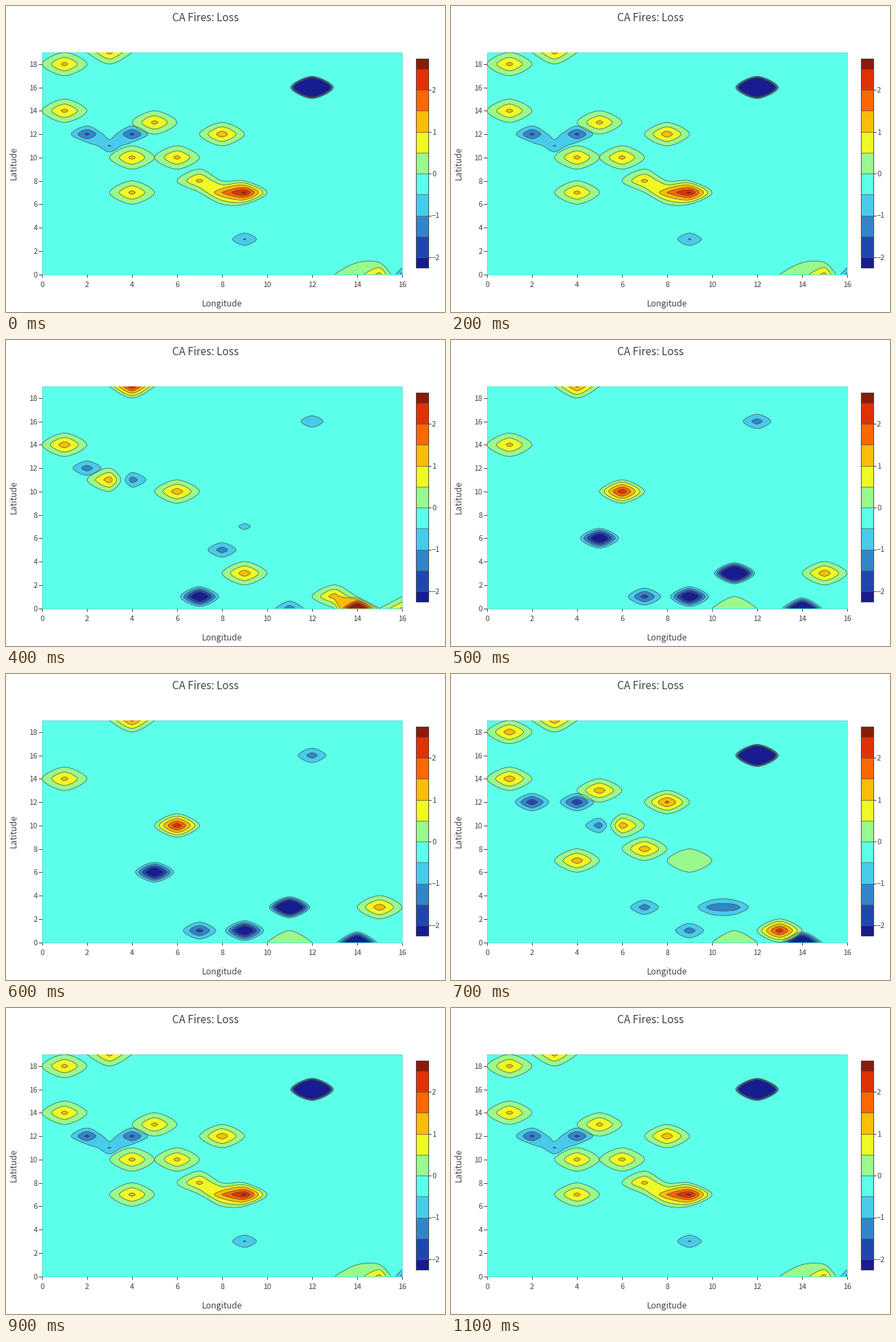
Animation of 634x442 px, one loop 1400 ms. Source, as a matplotlib script:

```python
import numpy as np
import matplotlib.pyplot as plt
from matplotlib.animation import FuncAnimation
from matplotlib.patches import PathPatch, Rectangle
from matplotlib.path import Path

W, H, DPI = 634, 442, 100
PX = 72 / DPI
INK = "#444444"
LEFT, RIGHT, TOP, BOTTOM = 52, 572, 67, 387.5
NX, NY = 17, 20
LEVELS = np.arange(-2, 2.6, 0.5)
COLORS = ["#171c8e", "#1f48ac", "#3385c9", "#48cbeb", "#5cffea", "#98fa8e",
          "#eff926", "#fbbc0a", "#fa6800", "#de3200", "#8a1c08"]
ZERO = 4  # index of the level at 0

plt.rcParams["font.family"] = ["Noto Sans CJK JP", "DejaVu Sans"]

# cell value -> grid cells (longitude, latitude); all others are empty
SPREAD = {
    1.17: [(1, 18), (3, 19), (1, 14), (5, 13), (4, 10), (6, 10), (4, 7),
           (7, 8), (15, 0)],
    1.33: [(8, 12)], 1.52: [(8, 7)], 2.66: [(9, 7)], 0.2: [(14, 0)],
    -1.67: [(2, 12), (4, 12)], -1.06: [(3, 11), (9, 3)],
    -1.17: [(16, 0)], -11: [(12, 16)],
}
SOUTH = {
    1.34: [(1, 14), (3, 11), (6, 10), (9, 3), (13, 1)],
    2.45: [(4, 19)], 4.2: [(14, 0)], 1.1: [(16, 0)],
    -1.32: [(2, 12), (4, 11), (8, 5), (11, 0)],
    -0.98: [(12, 16)], -0.67: [(9, 7)], -3.3: [(7, 1)],
}
SPARSE = {
    1.18: [(1, 14)], 1.35: [(15, 3)], 1.6: [(4, 19)], 2.48: [(6, 10)],
    0.3: [(11, 0)], -1.3: [(12, 16)], -1.8: [(7, 1)],
    -3.3: [(5, 6), (9, 1)], -5: [(11, 3)], -4.5: [(14, 0)],
}
MIXED = {
    1.33: [(1, 18), (3, 19), (1, 14), (5, 13), (6, 10), (4, 7), (7, 8)],
    1.65: [(8, 12)], 2.4: [(13, 1)], 0.3: [(9, 7), (11, 0)],
    -1.98: [(2, 12), (4, 12)],
    -1.32: [(5, 10), (7, 3), (10, 3), (11, 3), (9, 1)],
    -4.5: [(14, 0)], -11: [(12, 16)],
}
STATES = [SPREAD, SOUTH, SPARSE, MIXED]
SCHEDULE = [0, 0, 0, 1, 1, 2, 2, 3, 3, 0, 0, 0, 0, 0]


def px(lon):
    return LEFT + lon * (RIGHT - LEFT) / (NX - 1)


def py(lat):
    return BOTTOM - lat * (BOTTOM - TOP) / (NY - 1)


def handles(prev, here, after):
    """Centripetal Catmull-Rom control points before and after each vertex."""
    d1, d2 = prev - here, after - here
    a1 = np.sqrt(np.hypot(*d1.T))[:, None]
    a2 = np.sqrt(np.hypot(*d2.T))[:, None]
    num = a2 ** 2 * d1 - a1 ** 2 * d2
    return here + num / (3 * a2 * (a1 + a2)), here - num / (3 * a1 * (a1 + a2))


def smooth(line):
    """Return the curved outline and the same curve closed for filling."""
    closed = np.allclose(line[0], line[-1])
    step = np.hypot(*np.diff(line, axis=0).T)
    pts = np.vstack([line[:1], line[1:][step > 0.2 * step.mean()]])
    if closed:
        if np.allclose(pts[0], pts[-1]):
            pts = pts[:-1]
        before, after = handles(np.roll(pts, 1, 0), pts, np.roll(pts, -1, 0))
        verts, codes = [pts[0]], [Path.MOVETO]
        for i in range(len(pts)):
            j = (i + 1) % len(pts)
            verts += [after[i], before[j], pts[j]]
            codes += [Path.CURVE4] * 3
        path = Path(verts, codes)
        return path, path

    verts, codes = [pts[0]], [Path.MOVETO]
    if len(pts) < 3:
        verts.append(pts[-1])
        codes.append(Path.LINETO)
    else:
        before, after = handles(pts[:-2], pts[1:-1], pts[2:])
        verts += [before[0], pts[1]]
        codes += [Path.CURVE3] * 2
        for i in range(len(before) - 1):
            verts += [after[i], before[i + 1], pts[i + 2]]
            codes += [Path.CURVE4] * 3
        verts += [after[-1], pts[-1]]
        codes += [Path.CURVE3] * 2
    # ends on two different sides meet in the corner between them
    a, b = pts[0], pts[-1]
    side = a if min(abs(a[0] - LEFT), abs(a[0] - RIGHT)) < 0.01 else b
    other = b if side is a else a
    fill = Path(verts + [(side[0], other[1])], codes + [Path.LINETO])
    return Path(verts, codes), fill


def build(state):
    """Draw one data set, hidden, and return its artists."""
    z = np.full((NY, NX), -0.002)
    for value, cells in state.items():
        for lon, lat in cells:
            z[lat, lon] = value
    cs = ax.contour(px(np.arange(NX)), py(np.arange(NY)), z, levels=LEVELS)
    segs = cs.allsegs
    cs.remove()

    artists = []
    for i in [3, 2, 1, 0] + list(range(ZERO, len(LEVELS))):
        color = COLORS[i + 1] if i >= ZERO else COLORS[i]
        for line in segs[i]:
            if len(line) < 2:
                continue
            outline, fill = smooth(np.asarray(line))
            artists += [PathPatch(fill, fc=color, lw=0, zorder=2),
                        PathPatch(outline, fc="none", ec=INK, lw=0.65 * PX,
                                  zorder=3)]
    for art in artists:
        ax.add_patch(art)
        art.set_clip_path(plot)
        art.set_visible(False)
    return artists


def label(x, y, text, size, ha="center", **kw):
    return ax.text(x, y, text, fontsize=size * PX, color=INK, ha=ha,
                   va="baseline", **kw)


def rule(x0, y0, x1, y1, width=1):
    ax.plot([x0, x1], [y0, y1], color=INK, lw=width * PX,
            solid_capstyle="butt", zorder=4)


fig = plt.figure(figsize=(W / DPI, H / DPI), dpi=DPI, facecolor="white")
ax = fig.add_axes([0, 0, 1, 1])
ax.axis("off")

plot = Rectangle((LEFT, TOP), RIGHT - LEFT, BOTTOM - TOP, fc=COLORS[ZERO],
                 ec="#4fd6cc", lw=0.7 * PX, zorder=1)
ax.add_patch(plot)
layers = [build(s) for s in STATES]

label(240, 22, "CA Fires: Loss", 15.3, ha="left")
label(312, 434, "Longitude", 12.3)
label(18, 227, "Latitude", 12.3, rotation=90).set(ha="right", va="center")
for lon in range(0, NX, 2):
    rule(px(lon), BOTTOM, px(lon), BOTTOM + 4.5)
    label(px(lon), 406, str(lon), 10.8)
for lat in range(0, NY, 2):
    rule(LEFT - 5, py(lat), LEFT, py(lat))
    label(45.5, py(lat) + 4, str(lat), 10.8, ha="right")

# colour bar
BAR_X, BAR_W, UNIT, MID = 591.5, 18, 60.5, 242
edges = [-2.25, *LEVELS, 2.75]
for low, high, color in zip(edges, edges[1:], COLORS):
    ax.add_patch(Rectangle((BAR_X, MID - high * UNIT), BAR_W,
                           (high - low) * UNIT, fc=color, ec=INK,
                           lw=0.5 * PX))
ax.add_patch(Rectangle((BAR_X, MID - 2.75 * UNIT), BAR_W, 5 * UNIT,
                       fc="none", ec=INK, lw=0.8 * PX))
window = Rectangle((0, 0), 625.5, H, fc="none", ec="none")
ax.add_patch(window)
for v in range(-2, 3):
    y = MID - v * UNIT
    rule(BAR_X + BAR_W, y, BAR_X + BAR_W + 4, y)
    label(615, y + 4, str(v).replace("-", "\u2212"), 10.8, ha="left",
          clip_on=True).set_clip_path(window)

ax.set_xlim(0, W)
ax.set_ylim(H, 0)


def draw(i):
    for k, artists in enumerate(layers):
        for art in artists:
            art.set_visible(k == SCHEDULE[i])
    return []


anim = FuncAnimation(fig, draw, frames=len(SCHEDULE), interval=100,
                     init_func=lambda: draw(0), repeat=True, repeat_delay=0)
plt.show()
```
